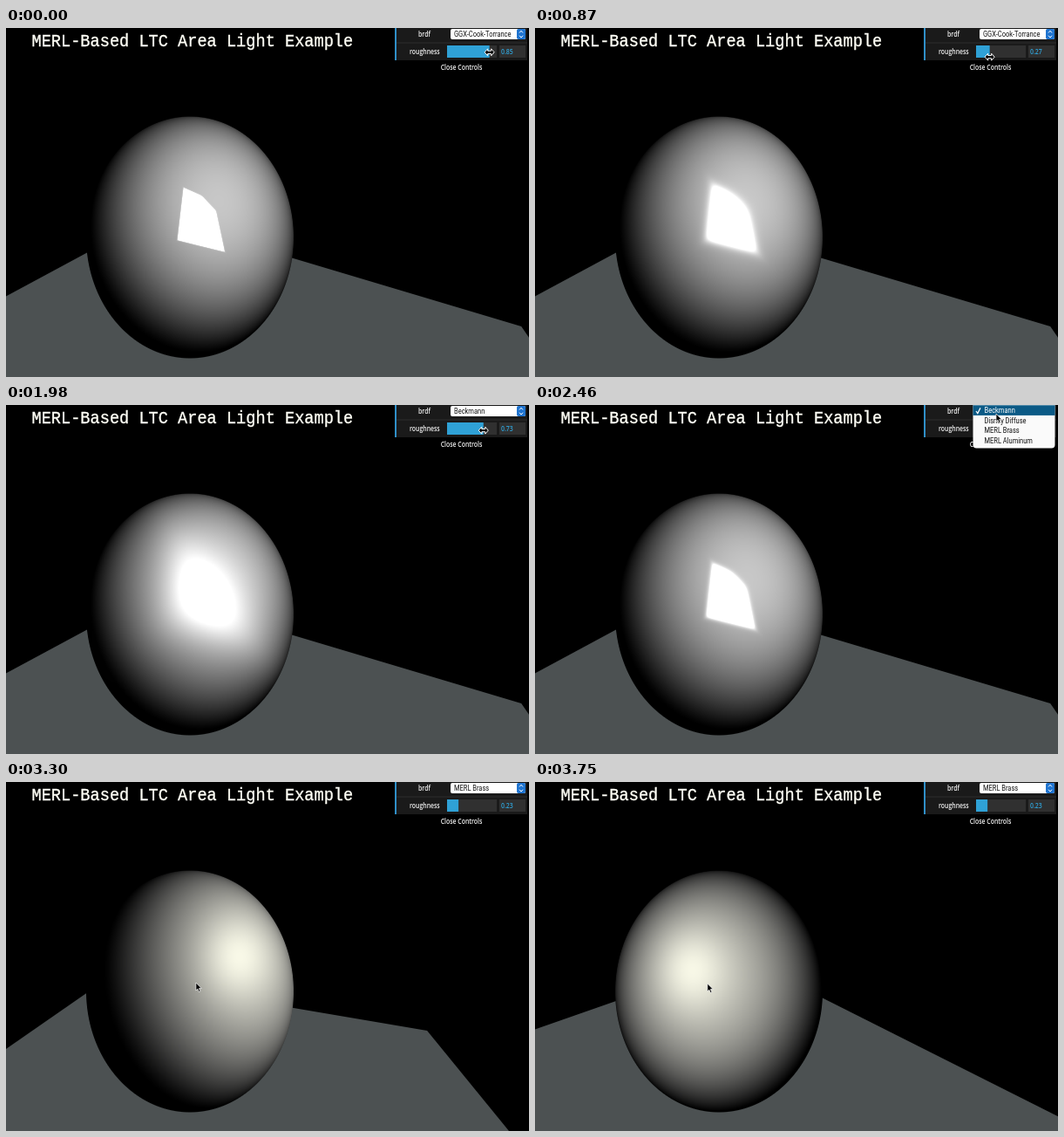
These frames come from a looping animation (600 by 400 pixels, 3780 ms). An HTML page with a canvas:

```html
<!DOCTYPE html>
<html lang="en">
<head>
<meta charset="utf-8">
<title>Area light</title>
<style>
html, body { margin: 0; width: 600px; height: 400px; overflow: hidden; background: #000; }
canvas, svg { position: absolute; left: 0; top: 0; display: block; }
.title { font: 18.63px "Liberation Mono", monospace; fill: #fffff6; stroke: #fffff6; stroke-width: .35px; }
.label { font: 600 6.9px "Open Sans", sans-serif; fill: #f2f2f2; }
.item { font: 7.5px Roboto, sans-serif; fill: #111; }
</style>
</head>
<body>
<canvas id="stage" width="600" height="400"></canvas>
<svg id="ui" width="600" height="400" viewBox="0 0 600 400">
  <text class="title" transform="translate(29.5 21) scale(1 1.12)">MERL-Based LTC Area Light Example</text>
  <path fill="#1a1a1a" d="M446 0H598V37H446z"/>
  <path fill="#2c2c2c" d="M448 16.5H598V17.5H448z"/>
  <path fill="#2f8fc8" d="M446 0h2v37h-2z"/>
  <text class="label" transform="translate(473 10) scale(1 1.16)">brdf</text>
  <text class="label" transform="translate(463 30) scale(1 1.16)">roughness</text>
  <text class="label" text-anchor="middle" transform="translate(522.5 47.5) scale(1 1.16)">Close Controls</text>
  <path fill="#303030" d="M506 20H563V34H506zM566 20H596V34H566z"/>
  <rect id="fill" x="506" y="20" height="14" fill="#2fa1d6"/>
  <text id="value" class="label" style="fill:#2fa1d6" transform="translate(568 30) scale(1 1.16)"></text>
  <rect x="510" y="1" width="86" height="12" rx="2" fill="#fff"/>
  <rect x="586" y="1" width="10" height="12" rx="2" fill="#1f74d0"/>
  <path d="M589 5.5l2-2.3 2 2.3M589 8.7l2 2.3 2-2.3" fill="none" stroke="#fff"/>
  <text id="choice" class="item" transform="translate(514 10) scale(1 1.12)"></text>
  <g id="popup">
    <rect id="sheet" x="502.5" width="94" rx="4" fill="#fafafa"/>
    <rect id="bar" x="502.5" width="94" height="11.6" fill="#0b5a86"/>
    <g id="items"></g>
    <path id="check" d="M506 0l1.8 2.6L511-3.6" fill="none" stroke-width="1.2"/>
  </g>
  <path id="arrow" d="M0 0V9l2-1.8 1.5 3.4 1.6-.7-1.5-3.3h2.8z" fill="#000" stroke="#fff" stroke-width=".7"/>
  <path id="resize" d="M-5.5 0l3.5-4v2.4h4V-4L5.5 0 2 4V1.6h-4V4z" fill="#000" stroke="#fff"/>
</svg>
<script>
const LOOP = 3780, STEP = 30, ROW = 11.6;
const NAMES = ["GGX-Cook-Torrance", "Beckmann", "Disney Diffuse", "MERL Brass", "MERL Aluminum"];

// Turning points [time, value...], eased in between
const ROUGH = [[-60, 0], [20, 1], [1330, 0], [1440, 1], [1620, 0], [1860, .9], [2220, .23]];
const ORBIT = [[3240, -12, 0], [3330, -30.6, 0], [3750, 7.5, 1]];
const PICK_ONE = [[1080, 510, 32], [1140, 529, 9], [1260, 529, 18], [1330, 506, 29]];
const PICK_TWO = [[2220, 519, 30], [2370, 529, 10], [2520, 529, 10], [2670, 529, 30], [3150, 209.5, 230]];
const LAMP = [[204, 184], [224, 193], [240, 210], [250, 256], [197, 243]];

const $ = id => document.getElementById(id);
const clamp = (v, lo, hi) => Math.min(hi, Math.max(lo, v));

function at(keys, t, col = 1) {
  const next = keys.findIndex(k => k[0] > t);
  if (next < 1) return keys[next < 0 ? keys.length - 1 : 0][col];
  const a = keys[next - 1], b = keys[next];
  const k = (1 - Math.cos(Math.PI * (t - a[0]) / (b[0] - a[0]))) / 2;
  return a[col] + (b[col] - a[col]) * k;
}

const edges = LAMP.map(([x, y], i) => {
  const [u, v] = LAMP[(i + 1) % LAMP.length], len = Math.hypot(u - x, v - y);
  return { x, y, nx: (v - y) / len, ny: (x - u) / len };
});

const ctx = $("stage").getContext("2d");
const BALL = { cx: 211, cy: 240, rx: 119, ry: 138.5, x: 90, y: 100, w: 242, h: 280 };
const layer = document.createElement("canvas");
layer.width = BALL.w;
layer.height = BALL.h;
const layerCtx = layer.getContext("2d");
const image = layerCtx.createImageData(BALL.w, BALL.h);

// A square seen in perspective, cut off just before the eye
function drawFloor(yaw, tilt) {
  const a = yaw * Math.PI / 180, s = Math.sin(a), c = Math.cos(a);
  const depth = p => .6 + p[1];
  const back = [s, c], right = [c, -s], left = [-c, s], near = [-s, -c];
  const clip = p => {
    const k = Math.min(1, (depth(p) - .03) / (depth(p) - depth(near)));
    return [p[0] + (near[0] - p[0]) * k, p[1] + (near[1] - p[1]) * k];
  };
  ctx.beginPath();
  for (const p of [back, right, clip(right), clip(left), left]) {
    ctx.lineTo(211 + 314 * p[0] / depth(p), 84.5 - 17.5 * tilt + (208 + 5 * tilt) / depth(p));
  }
  ctx.fillStyle = "#4c5152";
  ctx.fill();
}

// Coverage of the mirrored lamp, softened by the given spread
function glint(x, y, spread) {
  let sum = 1;
  for (const e of edges) {
    sum += Math.exp(Math.min(50, ((x - e.x) * e.nx + (y - e.y) * e.ny) / spread));
  }
  return 1 / sum;
}

function drawBall(yaw, tilt, rough, brass) {
  const lx = Math.tan((1.5 - 1.3 * yaw) * Math.PI / 180), ly = .33 - .2 * tilt;
  const len = Math.hypot(lx, ly, 1);
  const sx = -.125 - .022 * yaw, sy = .29 - .1 * tilt;
  const spread = .4 + 22 * rough * rough, shift = spread / 2;
  const data = image.data;
  for (let j = 0, o = 0; j < BALL.h; j++) {
    const y = BALL.y + j + .5, ny = (BALL.cy - y) / BALL.ry;
    for (let i = 0; i < BALL.w; i++, o += 4) {
      const x = BALL.x + i + .5, nx = (x - BALL.cx) / BALL.rx;
      const rr = nx * nx + ny * ny;
      const cover = clamp((1 - Math.sqrt(rr)) * 128 + .5, 0, 1);
      data[o + 3] = cover * 255;
      if (!cover) continue;
      const nz = Math.sqrt(Math.max(0, 1 - rr));
      const d = Math.max(0, (nx * lx + ny * ly + nz) / len);
      const shine = brass
        ? .2 * Math.exp(-((nx - sx) ** 2 + (ny - sy) ** 2) / .12)
        : glint(x - shift, y + shift, spread);
      const v = Math.min(1, .78 * d ** 1.4 + shine);
      data[o] = data[o + 1] = 255 * v;
      data[o + 2] = 255 * v * (brass ? 1 - .07 * v : 1);
    }
  }
  layerCtx.putImageData(image, 0, 0);
  ctx.drawImage(layer, BALL.x, BALL.y);
}

const items = NAMES.map(name => {
  const el = document.createElementNS("http://www.w3.org/2000/svg", "text");
  el.setAttribute("class", "item");
  el.textContent = name;
  return $("items").appendChild(el);
});

function set(id, attrs) {
  for (const k in attrs) $(id).setAttribute(k, attrs[k]);
}

// The pointer drags the slider, visits the menu twice, then drags the view
function pointer(t, value, yaw, tilt) {
  if (t >= 3150) return { x: 202.3 - .6 * yaw, y: 230 + tilt };
  const path = t >= 2220 ? PICK_TWO : t >= 1080 && t < 1330 ? PICK_ONE : null;
  if (path) return { x: at(path, t), y: at(path, t, 2) };
  return { x: 506 + 57 * value, y: 30.5 - 2.7 * Math.cos(t * 2 * Math.PI / 1700), drag: true };
}

function drawPanel(t, pick, yaw, tilt) {
  const value = at(ROUGH, t), { x, y, drag } = pointer(t, value, yaw, tilt);
  set("fill", { width: 57 * value });
  $("value").textContent = value.toFixed(2);
  $("choice").textContent = NAMES[pick];

  const open = (t >= 1140 && t < 1260) || (t >= 2370 && t < 2700);
  $("popup").style.display = open ? "" : "none";
  if (open) {
    const top = -pick * ROW, hot = clamp(pick + Math.floor(y / ROW), 0, 4);
    set("sheet", { y: top - 3, height: 5 * ROW + 6 });
    set("bar", { y: top + hot * ROW + .3 });
    set("check", { transform: "translate(0 7)", stroke: hot === pick ? "#fff" : "#111" });
    items.forEach((el, i) => {
      el.setAttribute("transform", `translate(515.5 ${top + i * ROW + 9.2}) scale(1 1.12)`);
      el.style.fill = i === hot ? "#fff" : "#111";
    });
  }

  $("arrow").style.display = drag ? "none" : "";
  $("resize").style.display = drag ? "" : "none";
  set(drag ? "resize" : "arrow", { transform: `translate(${x} ${y})` });
}

function draw(t) {
  const pick = t < 1260 ? 0 : t < 2700 ? 1 : 3;
  const yaw = at(ORBIT, t), tilt = at(ORBIT, t, 2);
  ctx.fillStyle = "#000";
  ctx.fillRect(0, 0, 600, 400);
  drawFloor(yaw, tilt);
  // The picture lags two steps behind the slider
  drawBall(yaw, tilt, at(ROUGH, t - 2 * STEP), pick === 3);
  drawPanel(t, pick, yaw, tilt);
}

let last = -1;
function tick() {
  const t = Math.floor(performance.now() % LOOP / STEP) * STEP;
  if (t !== last) draw(last = t);
  requestAnimationFrame(tick);
}
tick();
</script>
</body>
</html>
```
